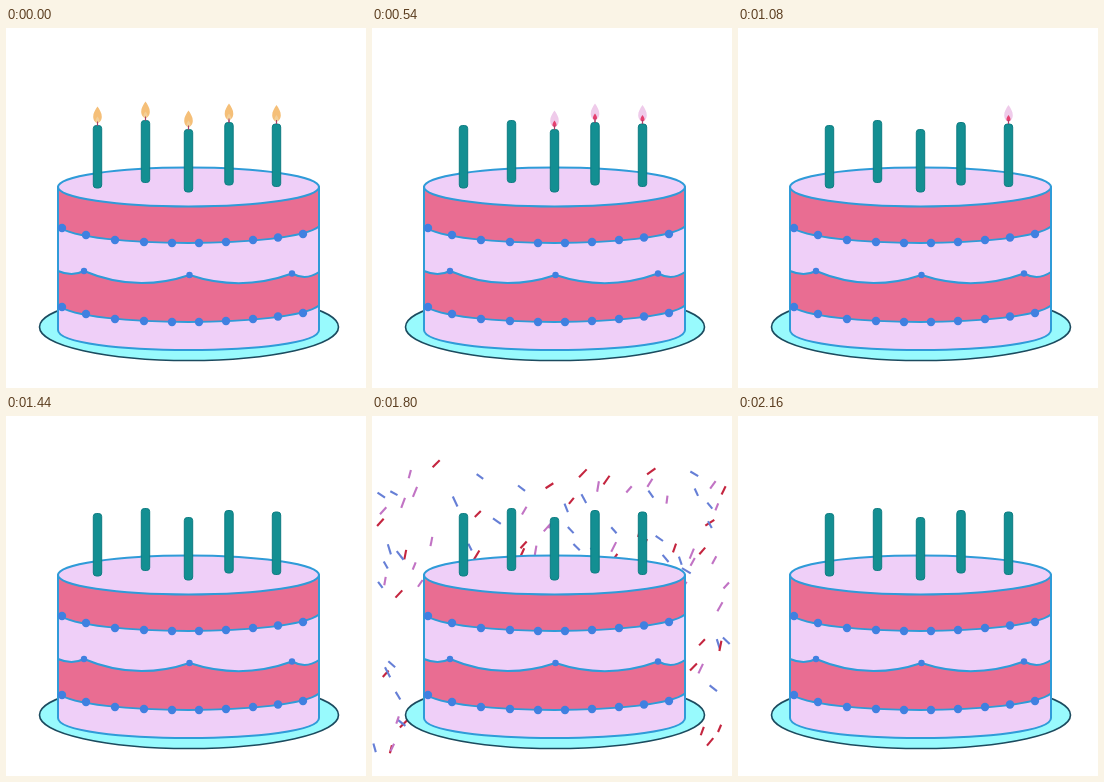
Animation of 360x360 px, one loop 2340 ms. Source, as an HTML page:

```html
<!DOCTYPE html>
<html lang="en">
<head>
<meta charset="utf-8">
<title>Birthday cake</title>
<style>
  html, body { margin: 0; width: 100%; height: 100%; overflow: hidden; background: #fff; }
  svg { display: block; width: 100vw; height: 100vh; }
</style>
</head>
<body>
<svg id="stage" viewBox="0 0 360 360"></svg>
<script>
const LOOP = 2340;
const PINK = '#efcff8', ROSE = '#e96d92', EDGE = '#2f9bd8', DOT = '#4080e0';
const stage = document.getElementById('stage');

function add(tag, attrs, parent = stage) {
  const node = document.createElementNS('http://www.w3.org/2000/svg', tag);
  for (const key in attrs) node.setAttribute(key, attrs[key]);
  return parent.appendChild(node);
}

function seeded(seed) {
  return () => (seed = (seed * 16807) % 2147483647) / 2147483647;
}

// Confetti, behind the cake
const confetti = add('g', { 'stroke-width': 2.4 });
const random = seeded(4217);
const between = (a, b) => a + (b - a) * random();
const kinds = [
  { color: '#c4253f', from: 8, to: 58 },
  { color: '#667fd6', from: -62, to: -15 },
  { color: '#c173c4', from: 5, to: 45 }
];

function makePiece(x, y) {
  const kind = kinds[Math.floor(random() * 3)];
  const half = between(4.3, 6.3);
  const node = add('line', { x1: 0, x2: 0, y1: -half, y2: half, stroke: kind.color }, confetti);
  return { x, y, node, angle: between(kind.from, kind.to), rank: random() };
}

const pieces = [];
for (let i = 0; i < 125; i++) pieces.push(makePiece(between(2, 358), 4 + 138 * random() ** 0.75));
for (let i = 0; i < 26; i++) {
  pieces.push(makePiece(i % 2 ? between(2, 47) : between(318, 358), between(142, 300)));
}
for (let i = 0; i < 5; i++) pieces.push(makePiece(between(10, 350), between(336, 351)));

// start time, distance fallen, share of pieces left, size
const fall = [
  [1620, 0, 1, 1],
  [1800, 40, 0.85, 0.88],
  [1920, 70, 0.7, 0.84],
  [1980, 90, 0.5, 0.8]
];

// Plate and cake
add('ellipse', { cx: 183, cy: 299, rx: 149.5, ry: 33.5, fill: '#98fafd', stroke: '#1b4b5f', 'stroke-width': 1.6 });

const outline = { stroke: EDGE, 'stroke-width': 2, 'stroke-linejoin': 'round' };
const body = 'M52 159V302C52 328.5 313 328.5 313 302V159Z';
const trim = y => `M52 ${y}C80 ${y + 22} 285 ${y + 22} 313 ${y}`;
const wave = 'M52 243Q66 249 78 243Q130 265 183.5 247Q235 264 286 245.5Q300 253 313 244';

add('path', { d: body, fill: PINK });
add('path', { d: trim(198.5) + 'V159H52Z', fill: ROSE });
add('path', { d: wave + 'V277.5C285 299.5 80 299.5 52 277.5Z', fill: ROSE });
for (const d of [trim(198.5), trim(277.5), wave, body]) {
  add('path', { d, fill: 'none', ...outline });
}
add('ellipse', { cx: 182.5, cy: 159, rx: 130.5, ry: 19.5, fill: PINK, ...outline });

const beads = [[56, 200], [80, 207], [109, 212], [138, 214], [166, 215],
  [193, 215], [220, 214], [247, 212], [272, 209.5], [297, 206]];
for (const [cx, y] of beads) {
  for (const cy of [y, y + 79]) add('circle', { cx, cy, r: 4.2, fill: DOT });
}
for (const [cx, cy] of [[78, 243], [183.5, 247], [286, 245.5]]) {
  add('circle', { cx, cy, r: 3.2, fill: DOT });
}

// Candles: centre, top, bottom, moment the flame goes out
const candles = [
  [91.5, 97.5, 160, 360], [139.5, 92.5, 154.5, 540], [182.5, 101.5, 164, 900],
  [223, 94.5, 157, 1080], [270.5, 96, 158.5, 1440]
].map(([x, top, bottom, out]) => {
  add('rect', {
    x: x - 4.2, y: top, width: 8.4, height: bottom - top, rx: 3,
    fill: '#138f92', stroke: '#0d7c82', 'stroke-width': 1
  });
  const flame = add('g', { transform: `translate(${x} ${top})` });
  add('path', { d: 'M0 0V-6', stroke: '#a8426a', 'stroke-width': 1.2 }, flame);
  const glow = add('path', {
    d: 'M0 -19C2 -16 4.5 -12.5 4.3 -8.5C4.1 -5 2 -2.5 0 -2.5C-2 -2.5 -4.1 -5 -4.3 -8.5C-4.5 -12.5 -2 -16 0 -19Z'
  }, flame);
  const core = add('path', {
    d: 'M0 -9C1.2 -7 2.3 -6 2 -4C1.6 -2.2 -1.6 -2.2 -2 -4C-2.3 -6 -1.2 -7 0 -9Z'
  }, flame);
  add('path', { d: 'M0 0V-4', stroke: '#a8426a', 'stroke-width': 1 }, flame);
  return { flame, glow, core, out };
});

function draw(t) {
  const blown = t >= 360;
  for (const { flame, glow, core, out } of candles) {
    flame.setAttribute('display', t < out ? 'inline' : 'none');
    glow.setAttribute('fill', blown ? '#efcbea' : '#f5bf78');
    core.setAttribute('fill', blown ? '#e5406f' : '#f3cf98');
  }

  const step = t < 2160 && fall.filter(([start]) => t >= start).pop();
  confetti.setAttribute('display', step ? 'inline' : 'none');
  if (!step) return;
  const [, drop, share, size] = step;
  for (const { x, y, node, angle, rank } of pieces) {
    node.setAttribute('display', rank < share ? 'inline' : 'none');
    node.setAttribute('transform', `translate(${x} ${y + drop}) rotate(${angle}) scale(${size})`);
  }
}

const begin = performance.now();
function tick() {
  draw((performance.now() - begin) % LOOP);
  requestAnimationFrame(tick);
}
tick();
</script>
</body>
</html>
```
